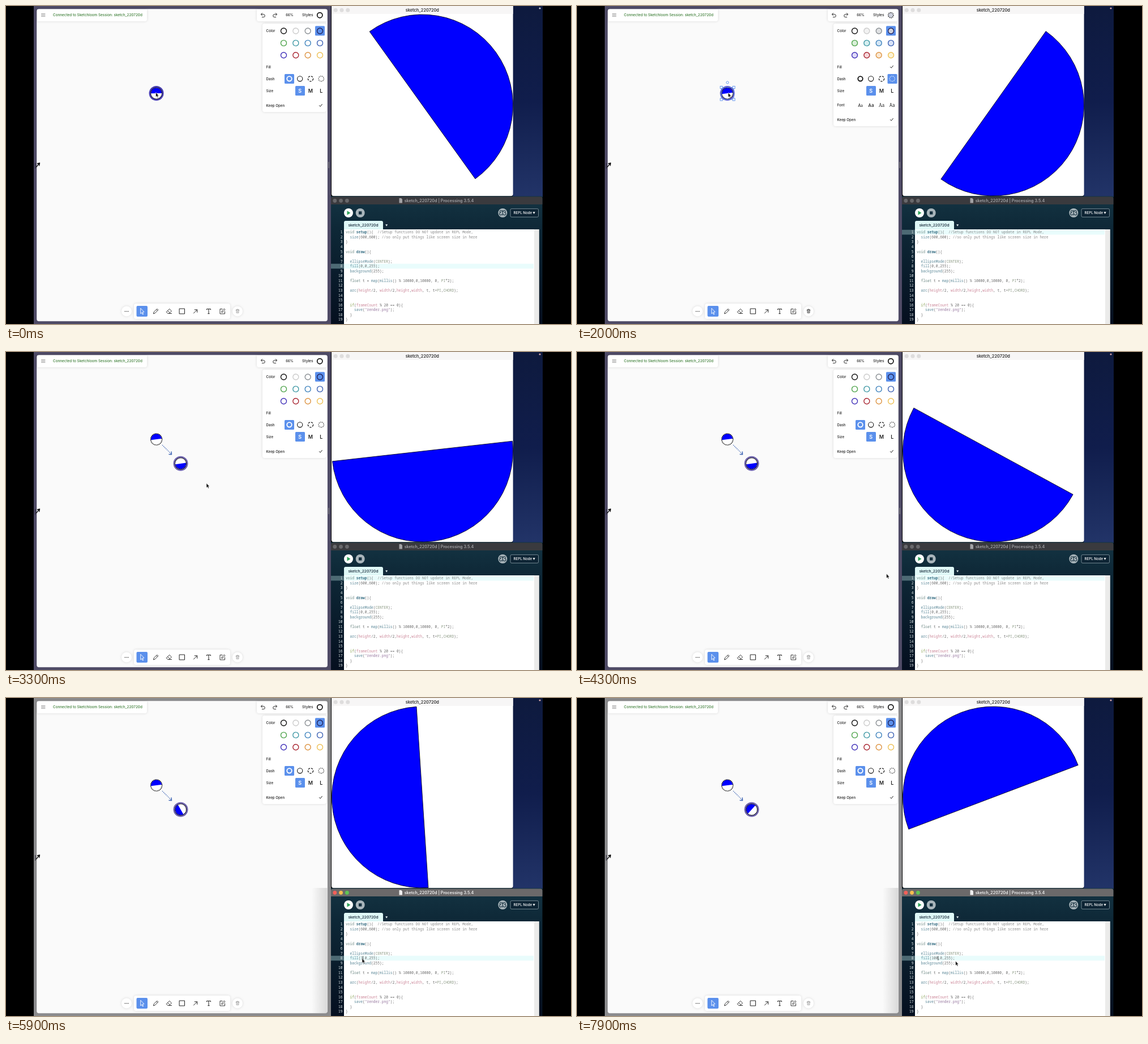
An HTML page that plays this animation: 998x561 px, repeating every 8 s.

```html
<!DOCTYPE html>
<html lang="en">
<head>
<meta charset="utf-8">
<title>Sketch session</title>
<style>
html, body { margin: 0; width: 100%; height: 100%; overflow: hidden; background: #000 }
svg { display: block; width: 998px; height: 561px }
text { font-family: Inter, sans-serif; white-space: pre }
.code { font-family: "Noto Sans Mono", monospace; font-size: 6.25px }
.line { fill: none; stroke: #222; stroke-linecap: round; stroke-linejoin: round }
.card { fill: #fff; filter: drop-shadow(0 0 2px #0002) }
</style>
</head>
<body>
<svg id="stage" viewBox="0 0 998 561"></svg>
<script>
const LOOP = 8000, BLUE = '#5b90ec';
const SELECT = 400, FORK = 2500, FOCUS = 4800, CLICK = 5300;

const rect = (x, y, w, h, fill, more = '') =>
  `<rect x="${x}" y="${y}" width="${w}" height="${h}" fill="${fill}" ${more}/>`;
const disc = (x, y, r, fill, more = '') =>
  `<circle cx="${x}" cy="${y}" r="${r}" fill="${fill}" ${more}/>`;
const ring = (x, y, r, color, w = 1, more = '') =>
  disc(x, y, r, 'none', `stroke="${color}" stroke-width="${w}" ${more}`);
const shape = (d, fill, more = '') => `<path d="${d}" fill="${fill}" ${more}/>`;
const line = (d, w = 1, more = '') => `<path class="line" d="${d}" stroke-width="${w}" ${more}/>`;
const label = (x, y, s, size = 6.2, fill = '#222', more = '') =>
  `<text x="${x}" y="${y}" font-size="${size}" fill="${fill}" font-weight="500" ${more}>${s}</text>`;
const middle = 'text-anchor="middle"';
const card = (x, y, w, h) => rect(x, y, w, h, '#fff', 'class="card" rx="4"');

// Value at time t from [time, value] keys: linear between keys, or held
function tween(keys, t) {
  const i = keys.findIndex(k => k[0] > t);
  if (i < 0) return keys.at(-1)[1];
  if (!i) return keys[0][1];
  const [[t0, a], [t1, b]] = [keys[i - 1], keys[i]];
  return a + (b - a) * (t - t0) / (t1 - t0);
}
const held = (keys, t) => keys.findLast(k => k[0] <= t)[1];

const spin = [[0, 234.3], [800, 263.4], [2000, 305.4], [3300, 353.6], [5200, 419.9], [6600, 472.6], [7900, 519.3]];
const mouseX = [[0, 264.5], [1600, 264.5], [1900, 267], [2600, 267], [3200, 354], [3600, 354], [4600, 629], [7300, 629], [7800, 668.5]];
const mouseY = [[0, 152.5], [1600, 152.5], [1900, 153], [2600, 153], [3200, 231.5], [3600, 231.5], [4600, 459.5], [7300, 459.5], [7800, 464]];
const firstThumb = [[0, 178], [SELECT, 172]];
const secondThumb = [[0, 325], [3100, 352], [5600, 60], [6800, 105], [7400, 132]];
const typed = [[0, '0'], [5700, ''], [5900, '1'], [6100, '10'], [6300, '100']];
const activeRow = [[0, 8], [SELECT, 1], [FOCUS, 9], [CLICK, 8]];

function half(x, y, r, deg, more) {
  const a = deg * Math.PI / 180, c = r * Math.cos(a), s = r * Math.sin(a);
  return shape(`M${x + c} ${y + s}A${r} ${r} 0 0 1 ${x - c} ${y - s}Z`, '#00f', more);
}

function node(x, y, deg, halo) {
  return (halo ? disc(x, y, 13, halo) : '') + disc(x, y, 10, '#fff') + half(x, y, 9.8, deg) +
    ring(x, y, 10, '#111', 1.7, 'stroke-dasharray="0.1 2.52" stroke-linecap="round"');
}

const inks = ['#111', '#ccc', '#8a8f94', '#22245c', '#4da34a', '#3f98a5', '#3d82bd', '#3d62b5',
  '#3f2fb8', '#a92632', '#dd9443', '#eec157'];
const tints = ['#fff', '#f2f2f2', '#dfe1e3', '#cdd0dc', '#d9efd8', '#d5eef0', '#d4e6f5', '#d8e2f6',
  '#dedaf7', '#f5d7da', '#fae8d3', '#fcf3d6'];
const dots = 'stroke-dasharray="1.2 1.6"', dashes = 'stroke-dasharray="3.5 2"';
const tick = y => line(`M553.5 ${y}l1.7 1.8l3.2-4`, 1);

function stylePanel(picked) {
  const end = picked ? 200.5 : 175.5;
  let s = card(453, 31, 113, picked ? 181 : 156) + rect(546, 35.3, 17, 17, BLUE, 'rx="1.5"');
  inks.forEach((ink, i) => {
    s += disc(490.5 + i % 4 * 21.35, 44 + (i >> 2) * 21.4, 5, picked ? tints[i] : 'none',
      `stroke="${ink}" stroke-width="1.4"`);
  });
  s += rect(picked ? 548.5 : 492, 120, 17, 17, BLUE, 'rx="1.5"') + rect(511, 141, 17, 17, BLUE, 'rx="1.5"');
  s += ring(500.5, 128.3, 4.2, picked ? '#111' : '#fff', 1.9) + ring(519.2, 128.3, 4.6, '#111', 1.1) +
    ring(538, 128.3, 4.6, '#111', 1.3, dashes) + ring(556.8, 128.3, 4.6, picked ? '#fff' : '#111', 1.3, dots);
  [['Color', 45.7], ['Fill', 109.5], ['Dash', 130.5], ['Size', 151.5], ['Keep Open', end + 2]]
    .forEach(([name, y]) => s += label(459.5, y, name));
  ['S', 'M', 'L'].forEach((c, i) =>
    s += label(519.3 + i * 18.7, 153.2, c, 9, i ? '#222' : '#fff', middle + ' style="font-weight:600"'));
  if (picked) {
    s += tick(107.5) + label(459.5, 177, 'Font');
    ['Lato', 'Inter', 'Noto Serif', 'Noto Sans Mono'].forEach((f, i) =>
      s += label(500.7 + i * 18.7, 177.8, 'Aa', i ? 8 : 7, '#222', `${middle} style="font-family:${f},sans-serif"`));
  }
  return s + tick(end);
}

function toolbar(picked) {
  const faint = picked ? '' : 'opacity=".45"';
  let s = card(226, 525, 170, 27) + disc(213, 538.5, 9, '#fff', 'class="card"') +
    disc(409, 538.5, 9, '#fff', 'class="card"') + rect(230.5, 529, 19.5, 19, BLUE, 'rx="2"');
  for (const x of [210.3, 213, 215.7]) s += disc(x, 538.7, .75, '#222');
  return s + line('M238 533.5l6 6.3l-3 .3l1.7 3.5l-1.4.6l-1.6-3.4l-1.7 1.8z', .9, 'style="stroke:#fff"') +
    line('M260.5 542.5l.8-2.8l5.5-5.5l2 2l-5.5 5.5zM265.5 535.5l2 2', .9) +
    line('M283.5 539.5l5.2-5.2l3.8 3.8l-4.3 4.4h-2zM285.5 537.5l4 4M288 542.5h4.5', .9) +
    line('M306.5 534h9v9h-9z') + line('M331.5 542l6-6m-4.3-.2h4.5v4.5') +
    line('M354.5 535.8v-1.3h7v1.3M358 534.5v8.2M356.7 542.7h2.6') +
    line('M382 534.5h-4v8.5h8.5v-4M381 540l.4-2l4-4l1.6 1.6l-4 4z', .9) +
    line('M406 536.3h6M407.7 536.3v-1.3h2.6v1.3M406.8 536.5l.3 5h3.8l.3-5M408.2 538v2M409.8 538v2', .75, faint);
}

function whiteboard(t) {
  const picked = t >= SELECT && t < FORK, forked = t >= FORK, focus = t < FOCUS;
  let s = rect(49, 0, 525, 561, focus ? '#4e4a65' : '#8b8b8d') +
    rect(54.7, 5.7, 512.8, 550, '#fafafa', 'rx="3" stroke="#fff" stroke-width=".8"');
  if (!focus) s += rect(540, 335, 27.5, 221, 'url(#shade)');
  s += rect(51.3, 277, 1, 10, '#2a2838') + rect(569.5, 275, 1.2, 11, '#888') +
    line('M53.5 284l5.5-6.5M55.5 278l4-1l-.8 4.5', 1.4, 'style="stroke:#111"');
  s += shape('M55 6H249V23q0 4-4 4H55z', '#fff', 'class="card"') +
    shape('M567 6H443V23q0 4 4 4H567z', '#fff', 'class="card"');
  s += line('M62.5 13.7h6.5M62.5 16h6.5M62.5 18.3h6.5', .7, 'style="stroke:#666"') +
    label(83, 18.2, 'Connected to Sketchloom Session: sketch_220720d', 6.35, '#3b7d35');
  s += line('M452.5 12.5l-2 2.2l2 2.2M450.8 14.7h4a2.5 2.5 0 0 1 0 5h-2.5', .95) +
    line('M476.5 12.5l2 2.2l-2 2.2M478.2 14.7h-4a2.5 2.5 0 0 0 0 5h2.5', .95) +
    label(501, 18.2, '66%', 6, '#222', middle) + label(523, 18.3, 'Styles', 6.6);
  s += disc(554.3, 16.2, 4.6, picked ? '#cdd0dc' : '#fff') + ring(554.3, 16.2, 4.6, '#111', 1.7, picked ? dots : '');
  s += stylePanel(picked) + toolbar(picked);
  s += node(265.6, 154, held(firstThumb, t), forked ? '' : picked ? '#605cd2' : '#4a40b4');
  if (picked) {
    s += rect(255, 143.5, 22, 21.5, 'none', `stroke="${BLUE}" stroke-width=".8"`);
    for (const x of [255, 277]) for (const y of [143.5, 165])
      s += rect(x - 2, y - 2, 4, 4, '#fff', `stroke="${BLUE}" stroke-width=".9"`);
    s += disc(265.8, 135, 2.1, '#fff', `stroke="${BLUE}" stroke-width=".9"`);
  }
  if (forked) s += line('M276.5 164.5L291 179', 1.5, 'style="stroke:#4167b5" stroke-dasharray="0.1 2.8"') +
    line('M288 180.5l4.5 .2l-.4-4.7', 1.4, 'style="stroke:#4167b5"') +
    node(308.5, 196.8, held(secondThumb, t), '#7065b0');
  return s;
}

function sketch(t) {
  let s = rect(895, 0, 53, 337, 'url(#sky)') + disc(943, 4, 1.6, t < 1500 ? '#c9c9d2' : '#d0a2a8') +
    rect(575, -4, 320.6, 339.2, '#fff', 'rx="4"') + rect(575, 0, 320.6, 14, '#f7f6f6');
  for (const x of [582.2, 593, 603.8]) s += disc(x, 7.3, 3.5, '#dedddd');
  return s + label(735.3, 9.8, 'sketch_220720d', 7.35, '#333', middle + ' style="font-weight:600"') +
    half(735.5, 175, 160, tween(spin, t), 'stroke="#000" stroke-width=".8"');
}

const source = n => `void setup(){  //Setup functions DO NOT update in REPL Mode,
  size(600,600); //so only put things like screen size in here
}

void draw(){

  ellipseMode(CENTER);
  fill(${n},0,255);
  background(255);

  float t = map(millis() % 10000,0,10000, 0, PI*2);

  arc(height/2, width/2,height,width, t, t+PI,CHORD);


  if(frameCount % 20 == 0){
    save("render.png");
  }
}`.split('\n');

const palette = [
  [/^\/\//, '#8a8a8a'], [/^"/, '#97779f'], [/^(void|float)$/, '#6f8a86'], [/^if$/, '#86a050'],
  [/^(setup|draw)$/, '#3a7085" font-weight="600'],
  [/^(size|ellipseMode|fill|background|map|millis|arc|save)$/, '#5a8797'],
  [/^(height|width|frameCount)$/, '#cc8799'], [/^(CENTER|PI|CHORD)$/, '#8a9882']
];
const paint = row => row.replace(/\/\/.*|"[^"]*"|[A-Za-z]+/g, word => {
  const hit = palette.find(p => p[0].test(word));
  return hit ? `<tspan fill="${hit[1]}">${word}</tspan>` : word;
});

function editor(t) {
  const focus = t >= FOCUS, row = held(activeRow, t), number = held(typed, t), pitch = 8.56;
  let s = rect(574, 335.5, 373.5, 226, 'url(#deep)') +
    shape('M574 350V340q0-3.5 3.5-3.5H944q3.5 0 3.5 3.5V350z', focus ? '#6b696a' : '#3a3a3e');
  const lights = focus ? ['#f2605a', '#f5bd4f', '#5fc454'] : ['#68686b', '#68686b', '#68686b'];
  lights.forEach((c, i) => s += disc(580.8 + i * 10.8, 343.5, 3.4, c));
  const ink = focus ? '#eee' : '#a2a2a5';
  s += shape('M694.5 339h3.5l2 2v6.5h-5.5z', ink) +
    label(765, 346, 'sketch_220720d | Processing 3.5.4', 7.2, ink, middle + ' style="font-weight:600"');
  s += disc(605, 365, 8, '#fff') + shape('M602.5 361.3l6 3.7l-6 3.7z', '#2fa35a') +
    disc(625.7, 365, 8, '#a9b5bb') + rect(623, 362.3, 5.4, 5.4, '#16303f') +
    disc(877.3, 365, 8, '#a9b5bb') +
    line('M877.3 360.5v8.5M876 362.8a1.8 1.8 0 1 0-2 1.6a2.2 2.2 0 1 0 2 2.8M878.6 362.8a1.8 1.8 0 1 1 2 1.6a2.2 2.2 0 1 1-2 2.8',
      1.1, 'style="stroke:#1a3442"');
  s += rect(891, 357.7, 49.5, 14.6, '#0d2434', 'rx="2" stroke="#9fb0b8" stroke-width=".7"') +
    label(896.5, 367.2, 'REPL Node', 6.2, '#fff') + shape('M930.5 363.2h4.2l-2.1 3.7z', '#fff');
  s += shape('M597 394V382q0-3 3-3H663q3 0 3 3V394z', '#dff8f7') +
    label(631, 388.9, 'sketch_220720d', 6.7, '#123', middle) +
    shape('M667 393V379H674q3 0 3 3V393z', '#12293a') + shape('M670.2 385.2h4l-2 3.5z', '#e4f0f2');
  s += rect(597, 394, 344.5, 167, '#fff') + rect(933, 394, 8.5, 167, '#ebebea');
  const top = 394.8 + (row - 1) * pitch;
  s += rect(574, top, 23, pitch, '#4d6a74') + rect(597, top, 335, pitch, '#e9fcfc');
  source(number).forEach((text, i) => {
    const y = 401.3 + i * pitch;
    s += `<text class="code" x="594.5" y="${y}" fill="#dfe8ea" text-anchor="end">${i + 1}</text>` +
      `<text class="code" x="600" y="${y}" fill="#707070">${paint(text)}</text>`;
  });
  if (t >= CLICK) s += rect(600 + 3.75 * (7 + number.length), top + .5, .8, pitch - 1, '#111');
  return s;
}

function pointer(t) {
  return shape('M0 0V8L1.9 6.4L3.2 9.2L4.6 8.5L3.3 5.8H5.6Z', '#111',
    `stroke="#fff" stroke-width=".6" transform="translate(${tween(mouseX, t)} ${tween(mouseY, t)})"`);
}

const gradient = (id, box, stops) => `<linearGradient id="${id}" ${box}>` +
  stops.map(([at, c]) => `<stop offset="${at}" stop-color="${c}"/>`).join('') + '</linearGradient>';
const down = 'x1="0" y1="0" x2="0" y2="1"';
const defs = '<defs>' + gradient('sky', down, [[0, '#0e1a3e'], [.5, '#101d4c'], [1, '#223468']]) +
  gradient('deep', down, [[0, '#143443'], [.25, '#0e2837'], [1, '#050f1f']]) +
  gradient('shade', '', [[0, '#0000'], [1, '#0002']]) + '</defs>';

const stage = document.getElementById('stage');
let shown = -1;
function frame(now) {
  const t = Math.floor(now % LOOP / 100) * 100;
  if (t !== shown) {
    shown = t;
    stage.innerHTML = defs + whiteboard(t) + sketch(t) + editor(t) + pointer(t);
  }
  requestAnimationFrame(frame);
}
frame(0);
</script>
</body>
</html>
```
